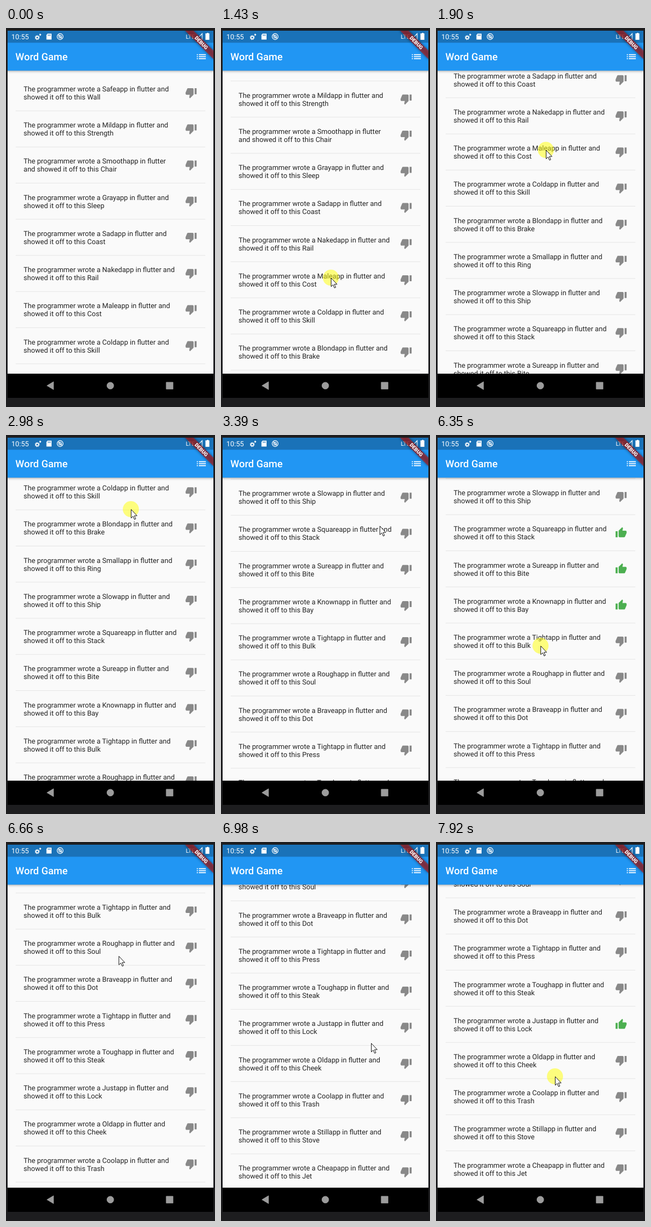
Write an HTML page that moves like this. It is 390 by 705 pixels and loops after 8000 ms.

```html
<!DOCTYPE html>
<html lang="en">
<head>
<meta charset="utf-8">
<title>Word Game</title>
<style>
  html, body { margin: 0; width: 100%; height: 100%; overflow: hidden; background: #1d1d1f; }
  svg { display: block; width: 390px; height: 705px; }
  text { font-family: Roboto, "Open Sans", sans-serif; text-rendering: geometricPrecision; }
  #rows text { font-size: 13.07px; fill: #232323; }
</style>
</head>
<body>
<svg viewBox="0 0 390 705" xmlns="http://www.w3.org/2000/svg">
  <defs>
    <clipPath id="app"><rect x="3" y="5" width="384" height="638"/></clipPath>
    <clipPath id="list"><rect x="3" y="79" width="384" height="564"/></clipPath>
    <linearGradient id="shade" x2="0" y2="1">
      <stop offset="0" stop-opacity=".3"/>
      <stop offset=".4" stop-opacity=".1"/>
      <stop offset="1" stop-opacity="0"/>
    </linearGradient>
    <filter id="soft" x="-20%" y="-80%" width="140%" height="260%"><feGaussianBlur stdDeviation="2.4"/></filter>
    <path id="down" d="M15 3H6c-.83 0-1.54.5-1.84 1.22l-3.02 7.05c-.09.23-.14.47-.14.73v2c0 1.1.9 2 2 2h6.31l-.95 4.57-.03.32c0 .41.17.79.44 1.06L9.83 23l6.59-6.59c.36-.36.58-.86.58-1.41V5c0-1.1-.9-2-2-2zm4 0v12h4V3h-4z"/>
    <path id="up" d="M1 21h4V9H1v12zm22-11c0-1.1-.9-2-2-2h-6.31l.95-4.57.03-.32c0-.41-.17-.79-.44-1.06L14.17 1 7.59 7.59C7.22 7.95 7 8.45 7 9v10c0 1.1.9 2 2 2h9c.83 0 1.54-.5 1.84-1.22l3.02-7.05c.09-.23.14-.47.14-.73v-2z"/>
  </defs>

  <rect width="390" height="705" fill="#1d1d1f"/>
  <rect x="3" y="79" width="384" height="564" fill="#fafafa"/>
  <g clip-path="url(#list)"><g id="rows"></g></g>
  <rect x="3" y="79" width="384" height="6" fill="url(#shade)"/>

  <rect x="3" y="27" width="384" height="52.3" fill="#2196f3"/>
  <rect x="3" y="5" width="384" height="22.4" fill="#1a72b8"/>
  <g fill="#fff">
    <text x="17.6" y="60" font-size="18.68" font-weight="500">Word Game</text>
    <path transform="translate(353.3 42.2) scale(.934)" d="M3 11h2v2H3zM3 15h2v2H3zM3 7h2v2H3zM7 11h14v2H7zM7 15h14v2H7zM7 7h14v2H7z"/>
    <text x="10" y="20.7" font-size="13.1">10:55</text>
    <text x="335.5" y="20" font-size="10.8">LTE</text>
    <path d="M77.5 10.5h7.5v11h-9.500v-8.500z"/>
    <path d="M78.600 12.200v2.500M80.600 12.200v2.500M82.600 12.200v2.500" stroke="#1a72b8"/>
    <path d="M374.200 10h1v-1h2.400v1h1.900v12h-7.300v-12z"/>
    <path d="M63.500 10.200l2.500 2.300-2.500 2.300-1.500-2.300z"/>
  </g>
  <g fill="none" stroke="#fff">
    <circle cx="58.300" cy="17.800" r="2.500" stroke-width="1.700"/>
    <circle cx="58.300" cy="17.800" r="3.900" stroke-width="1.300" stroke-dasharray="1.500 1.560"/>
    <circle cx="101" cy="16" r="5.500" stroke-width="1.300"/>
    <circle cx="101" cy="16" r="2.500" stroke-width="1.200"/>
    <path d="M97.500 12.500l7 7" stroke-width="1.200"/>
    <path d="M355.500 21.300L366 10.500v10.800z" stroke-width="1.200"/>
  </g>
  <g clip-path="url(#app)">
    <g transform="translate(387 5) rotate(45)">
      <rect x="-37.400" y="26.150" width="74.800" height="11.200" opacity=".5" filter="url(#soft)"/>
      <rect x="-37.400" y="26.150" width="74.800" height="11.200" fill="#b71c1c" fill-opacity=".63"/>
      <text y="35.100" text-anchor="middle" font-size="9.500" font-weight="900" fill="#fff">DEBUG</text>
    </g>
  </g>

  <rect x="3" y="643" width="384" height="45" fill="#000"/>
  <g fill="#9c9c9c" stroke="#9c9c9c" stroke-linejoin="round">
    <path d="M76.500 665.300L88.700 658v14.600z"/>
    <circle cx="194.700" cy="665.300" r="6.300"/>
    <rect x="299" y="659" width="12.700" height="12.700"/>
  </g>

  <g id="pointer">
    <circle id="press" r="15" fill="#ff0" fill-opacity=".5"/>
    <path d="M.5.5V16.500L4.100 13.100L6.700 19L9.100 18L6.500 12.200H11.500Z" fill="#fff" stroke="#111"/>
  </g>
</svg>
<script>
const LOOP = 8000, PITCH = 67.23;
const words = ("Safe Wall,Mild Strength,Smooth Chair,Gray Sleep,Sad Coast,Naked Rail,Male Cost,Cold Skill," +
  "Blond Brake,Small Ring,Slow Ship,Square Stack,Sure Bite,Known Bay,Tight Bulk,Rough Soul,Brave Dot," +
  "Tight Press,Tough Steak,Just Lock,Old Cheek,Cool Trash,Still Stove,Cheap Jet").split(",");
const likedAt = { 11: 4240, 12: 5110, 13: 5800, 19: 7520 };
const presses = [[1250, 1960], [2690, 3010], [4870, 5110], [5560, 5800], [6300, 6610], [7330, 7520], [7880, LOOP]];

const linear = k => k;
const smooth = k => k * k * (3 - 2 * k);
const rush = k => k ** 1.3;
const fling = p => k => 1 - (1 - k) ** p;

// Each key: time, values, easing used to arrive there.
const scrollKeys = [
  [1250, [0]], [1900, [293], smooth], [2500, [333], fling(3)],
  [2690, [333]], [2980, [484], rush], [3560, [678.2], fling(4.2)],
  [6355, [678.2]], [6600, [870], rush], [7300, [1058.6], fling(4.48)]
];
const pointerKeys = [
  [900, [240, 641]], [1250, [205, 520], smooth], [1900, [205, 227], smooth],
  [2160, [208, 205], fling(2)], [2520, [215, 289], smooth],
  [2690, [215, 289]], [2980, [233, 138], rush], [3390, [296, 169], smooth], [3940, [345, 181], smooth],
  [4560, [345, 181]], [4820, [346, 246], smooth],
  [5130, [346, 246]], [5520, [348, 316], smooth],
  [5950, [348, 316]], [6260, [195, 392], smooth],
  [6355, [195, 392]], [6600, [205, 200], rush], [6980, [280, 374], smooth], [7300, [343, 339], smooth],
  [7520, [343, 339]], [7800, [224, 450], smooth], [7920, [222, 436], smooth]
];

function valueAt(keys, t) {
  const next = keys.findIndex(key => key[0] > t);
  if (next === 0) return keys[0][1];
  if (next < 0) return keys[keys.length - 1][1];
  const [t0, from] = keys[next - 1];
  const [t1, to, ease = linear] = keys[next];
  const k = ease((t - t0) / (t1 - t0));
  return from.map((v, i) => v + (to[i] - v) * k);
}

const byId = id => document.getElementById(id);
const rows = byId("rows"), pointer = byId("pointer"), press = byId("press");

rows.innerHTML = words.map((pair, i) => {
  const [adjective, noun] = pair.split(" ");
  const wrapsEarly = adjective === "Smooth";
  return `<g transform="translate(0 ${i * PITCH})">
    <text x="32.8" y="118">The programmer wrote a ${adjective}app in flutter${wrapsEarly ? "" : " and"}</text>
    <text x="32.8" y="133">${wrapsEarly ? "and " : ""}showed it off to this ${noun}</text>
    <use href="#down" fill="#898989" transform="translate(334.2 109.2) scale(.934)"/>
    <rect x="18" y="153.6" width="354" height="1" fill="#e5e5e5"/>
  </g>`;
}).join("");
const thumbs = [...rows.querySelectorAll("use")];

function render(t) {
  rows.setAttribute("transform", `translate(0 ${-valueAt(scrollKeys, t)[0]})`);
  for (const i in likedAt) {
    const liked = t >= likedAt[i];
    thumbs[i].setAttribute("href", liked ? "#up" : "#down");
    thumbs[i].setAttribute("fill", liked ? "#4caf50" : "#898989");
  }
  pointer.setAttribute("visibility", t < 900 ? "hidden" : "visible");
  pointer.setAttribute("transform", `translate(${valueAt(pointerKeys, t)})`);
  press.setAttribute("opacity", presses.some(([a, b]) => t >= a && t < b) ? 1 : 0);
}

const start = performance.now();
function tick() {
  render((performance.now() - start) % LOOP);
  requestAnimationFrame(tick);
}
tick();
</script>
</body>
</html>
```
